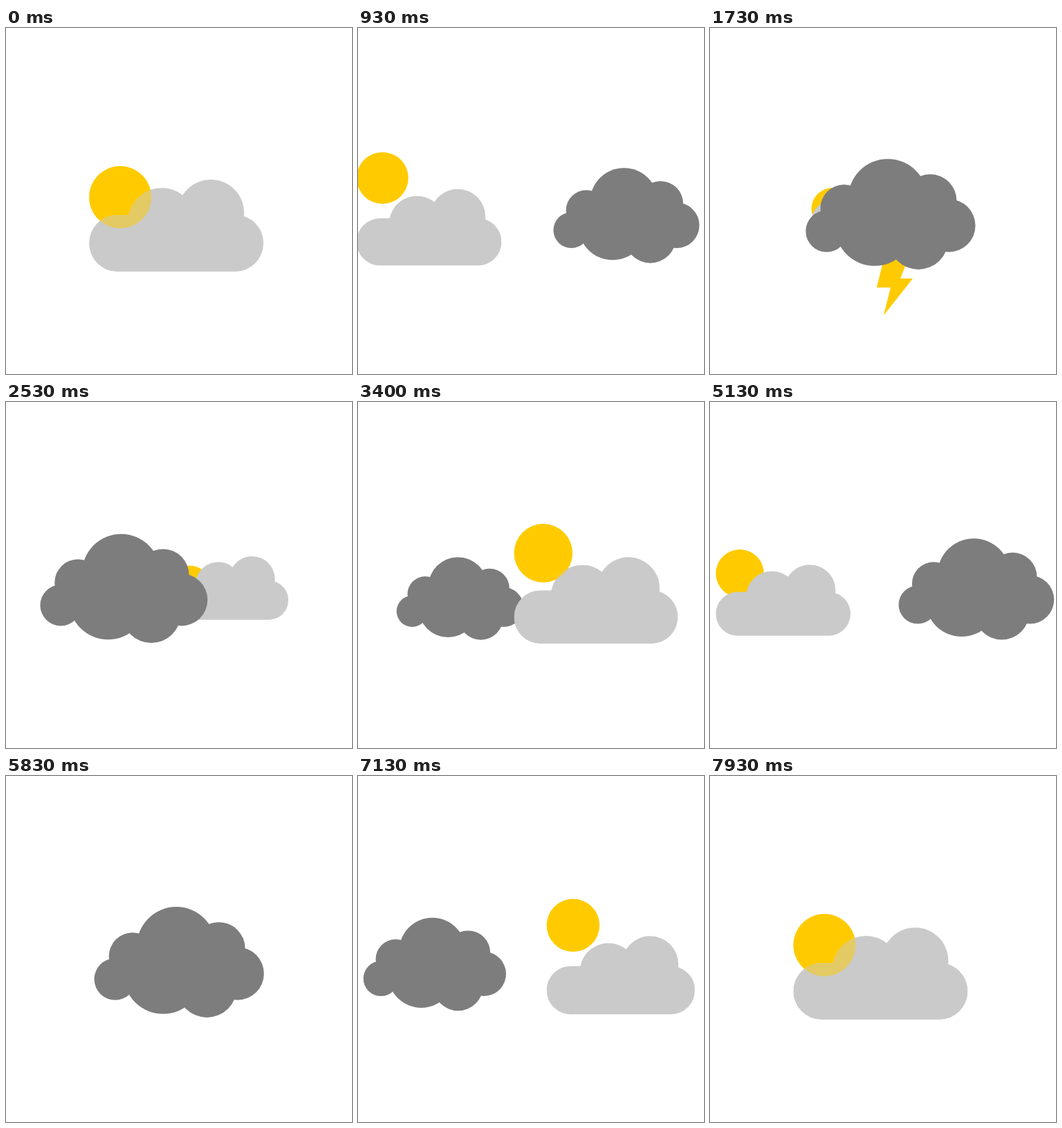
Animation of 500x500 px, one loop 8010 ms. Source, as an HTML page:

```html
<!DOCTYPE html>
<html lang="en">
<head>
<meta charset="utf-8">
<title>Changing weather</title>
<style>
  html, body { margin: 0; width: 100%; height: 100%; overflow: hidden; background: #fff; }
  svg { display: block; width: 100%; height: 100%; }
  .sun, #bolt { fill: #ffcb00; }
</style>
</head>
<body>
<svg viewBox="0 0 500 500">
  <defs>
    <clipPath id="cloud">
      <rect x="-126" y="-15.5" width="252" height="82" rx="41"/>
      <circle cx="-21" cy="-6" r="48.5"/>
      <circle cx="50" cy="-18.5" r="48"/>
    </clipPath>
  </defs>
  <g id="stage">
    <g id="fair">
      <circle class="sun" cx="-81" r="45"/>
      <g clip-path="url(#cloud)">
        <rect x="-150" y="-100" width="300" height="200" fill="#cacaca"/>
        <circle class="sun" id="glow" cx="-81" r="45" opacity=".5"/>
      </g>
    </g>
    <g id="storm">
      <path id="bolt" d="M-8 60H28L14 95H32L-10 148L0 108H-20Z"/>
      <g fill="#7d7d7d">
        <circle cx="-92" cy="24.5" r="30"/>
        <circle cx="-67" cy="-8.5" r="34"/>
        <circle cx="-4" cy="-22.5" r="57"/>
        <circle cx="57" cy="-19.5" r="38"/>
        <circle cx="84" cy="16.5" r="38"/>
        <circle cx="40" cy="36.5" r="43"/>
        <circle cx="-23" cy="17.5" r="57"/>
      </g>
    </g>
  </g>
</svg>
<script>
const LOOP = 8010, LAP = 4000, TAU = 2 * Math.PI;
const $ = id => document.getElementById(id);
const stage = $('stage'), fair = $('fair'), storm = $('storm'), glow = $('glow'), bolt = $('bolt');
const suns = document.querySelectorAll('.sun');

// The turn eases to a near stop each time a cloud reaches the front.
function angleAt(t) {
  const p = (t - 20) / (LAP / 2);
  return Math.PI * (p - 0.09 * Math.sin(TAU * p) - 0.034 * Math.sin(2 * TAU * p));
}

const orbitX = (s, skew) => 246 - 141 * s + skew * s * s;
const place = (el, x, y, scale) => el.setAttribute('transform', `translate(${x} ${y}) scale(${scale})`);
const show = (el, on) => { el.style.display = on ? '' : 'none'; };

function drawFair(angle) {
  const c = Math.cos(angle), s = Math.sin(angle);
  const y = 288 - (c > 0 ? 2.5 : 27) * c * c;
  place(fair, orbitX(s, -3.5), y, 0.81 + 0.165 * c + 0.025 * c * c);
  const drop = c > 0 ? 45 * (1 - Math.abs(s)) : 86 * (1 - (1 + c) ** 2);
  suns.forEach(sun => sun.setAttribute('cy', drop - 86));
  show(glow, c > 0);
}

function drawStorm(angle, t) {
  const c = Math.cos(angle), s = Math.sin(angle);
  const y = 270.5 + (c > 0 ? -1.5 : 27) * c * c;
  place(storm, orbitX(s, 2), y, 0.885 + 0.16 * c - 0.04 * c * c);
  show(bolt, t >= 1650 && t < 2150 && t % 400 < 200);
  bolt.setAttribute('transform', `translate(0 ${(1700 - t) / 20})`);
}

function draw(ms) {
  // Twenty pictures a second, held for 30 and 70 ms in turn.
  const step = Math.min(159, Math.floor(ms / 100) * 2 + (ms % 100 >= 30 ? 1 : 0));
  const t = step * 50 % LAP;
  const angle = angleAt(t);
  drawFair(angle);
  drawStorm(angle + Math.PI, t);
  const front = Math.cos(angle) > 0 ? fair : storm;
  if (stage.lastElementChild !== front) stage.appendChild(front);
}

const start = performance.now();
function tick() {
  draw((performance.now() - start) % LOOP);
  requestAnimationFrame(tick);
}
tick();
</script>
</body>
</html>
```
